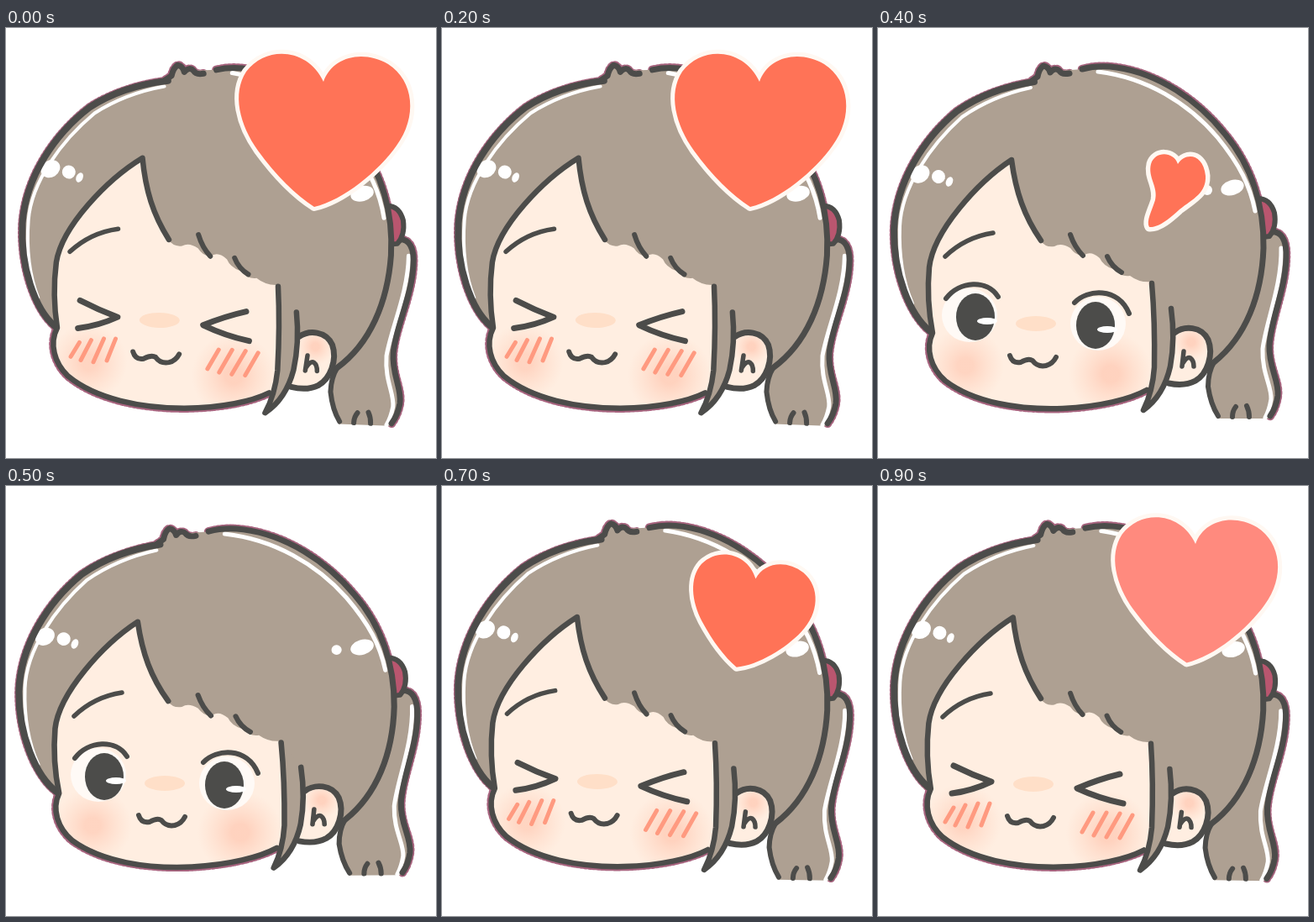
These frames come from a looping animation (512x512 px, 1000 ms). An HTML page with a canvas:

```html
<!DOCTYPE html>
<html lang="en">
<head>
<meta charset="utf-8">
<title>Girl with heart</title>
<style>
html, body { margin: 0; height: 100%; overflow: hidden; background: #fff; }
canvas { display: block; width: 100vw; height: 100vh; }
</style>
</head>
<body>
<canvas id="stage" width="512" height="512"></canvas>
<script>
const ctx = document.getElementById('stage').getContext('2d');
const INK = '#4c4c4a', HAIR = '#aea092', SKIN = '#ffeee1', RED = '#ff7357';

// Head tilt in degrees, head offset, face offset [x, y, tilt], eyes and heart per pose.
const POSES = {
  squat: { rot: -0.5, dy: 0, face: [1, 2, 0], sx: 1.015, sy: 0.988 },
  rise:  { rot: 0, dy: 0, face: [0, 0, 0], sprout: true },
  grow:  { rot: 1.1, dy: 1, face: [-3, 0, 0.4], closed: true,
           heart: { x: 368, y: 152, size: 0.72, tilt: 8, tint: RED } },
  lean:  { rot: 2.1, dy: 1.5, face: [-5, -4, 0.9], closed: true,
           heart: { x: 378.5, y: 122, size: 1, tilt: 0, tint: RED } },
  beat:  { rot: 1.1, dy: 1.5, face: [-3, 3, 0], closed: true,
           heart: { x: 378.5, y: 124, size: 0.95, tilt: 0, tint: '#ff8a7e' } }
};
// The heart beats, shrinks away, then pops back up the same way.
const ORDER = ['lean', 'beat', 'lean', 'grow', 'rise', 'squat', 'rise', 'grow', 'lean', 'beat'];
const STEP = 100;

const shape = d => new Path2D(d);
const sideCurve = 'M62 361C38 342 18 292 19 240C21 184 54 132 94 99C124 78 160 68 186 64';
const crownCurve = 'C258 45 270 45 284 47C334 54 381 86 413 126C445 164 460 212 459 262C457 318 438 368 400 398';
const jaw = 'C118 184 66 242 61 285C58 318 61 342 65 363C56 382 63 405 80 420C114 446 168 455 220 453';
const P = {
  hair: shape(sideCurve + 'L197 45L205 53L216 51L243 49' + crownCurve + 'L345 410L300 380L64 362Z'),
  side: shape(sideCurve),
  knob: shape('M183 63L190 58Q192 48 197 45Q203 46 205 53Q211 46 216 51Q219 56 228 54'),
  crown: shape('M243 49' + crownCurve),
  tail: shape('M462 244C480 241 487 252 486 274C485 312 468 346 466 378C465 404 478 420 476 438Q474 455 465 465L404 465Q394 447 394 424Q395 405 402 396C444 364 462 320 462 244Z'),
  tailRight: shape('M467 243C480 241 487 252 486 274C485 312 468 346 466 378C465 404 478 420 476 438Q474 452 467 462'),
  tailLeft: shape('M400 398Q393 410 393 427Q396 448 405 462'),
  tailTips: shape('M422 463Q422 456 426 451M442 463Q442 456 439 450'),
  tailShine: shape('M480 262C481 306 462 350 458 382C457 412 469 426 468 442Q466 455 461 464'),
  tie: shape('M452 203Q467 203 472 220Q475 237 466 248L458 249Z'),
  shineSide: shape('M41 328C27 296 25 262 26 236C28 190 62 140 100 106Q136 81 182 71'),
  shineCrown: shape('M262 52C320 59 370 90 404 130C431 163 443 188 449 218'),
  face: shape('M159 157' + jaw + 'C272 451 310 440 328 425L327 302Q312 304 300 295Q290 297 280 287Q268 283 264 274Q254 265 246 270Q237 273 229 262Q218 255 210 260Q200 262 193 253C173 224 164 195 159 157Z'),
  bangs: shape('M194 253C174 224 164 195 159 157' + jaw + 'C264 451 300 442 320 431'),
  strands: shape('M229 246Q234 261 244 271M273 272Q278 284 290 291'),
  lock: shape('M326 301L349 335Q354 370 348 403Q340 438 316 455Q327 433 329 404Q330 350 326 301Z'),
  lockLines: shape('M326 304Q330 350 329 404Q327 433 316 455Q340 438 348 403Q354 370 349 334'),
  ear: shape('M352 364C365 354 385 355 393 371C400 389 392 412 378 420Q365 427 345 423Q352 394 352 364Z'),
  earLine: shape('M353 363C365 354 385 355 393 371C400 389 392 412 378 420Q365 427 346 423'),
  earFold: shape('M364 385L362 403M363 399Q368 391 372 393Q376 396 376 403'),
  brow: shape('M80 272Q104 249 137 244'),
  mouth: shape('M157 390Q160 400 170 398Q179 393 184 396Q190 404 200 402Q208 400 212 392'),
  lashes: shape('M81 322C97 301 130 299 143 320M234 327C249 311 286 308 299 340'),
  squint: shape('M93 330Q115 341 138 349Q115 360 91 363M291 340Q266 346 240 357Q266 369 295 375'),
  blush: shape('M93 380L83 397M107 377L95 401M122 375L110 403M136 375L126 401M259 386L246 409M275 386L260 413M291 387L275 415M306 389L291 416'),
  heart: shape('M378 64C360 24 310 20 286 52C269 78 278 115 300 146C322 176 345 199 367 213C402 205 444 170 465 140C490 106 486 63 455 43C424 25 388 35 378 64Z'),
  sprout: shape('M357 162C352 147 330 146 325 162C321 178 334 189 330 205C326 218 319 230 323 237C335 238 349 225 359 216C376 203 391 196 390 176C387 149 366 148 357 162Z')
};

function fill(path, color) {
  ctx.fillStyle = color;
  ctx.fill(path);
}

function line(path, width = 7, color = INK) {
  ctx.lineWidth = width;
  ctx.strokeStyle = color;
  ctx.stroke(path);
}

function oval(x, y, rx, ry, color, turn = 0) {
  ctx.fillStyle = color;
  ctx.beginPath();
  ctx.ellipse(x, y, rx, ry, turn, 0, Math.PI * 2);
  ctx.fill();
}

function glow(x, y, r, alpha) {
  const g = ctx.createRadialGradient(x, y, r * 0.2, x, y, r);
  g.addColorStop(0, `rgba(255,192,168,${alpha})`);
  g.addColorStop(1, 'rgba(255,205,182,0)');
  oval(x, y, r, r, g);
}

function turn(x, y, deg) {
  ctx.translate(x, y);
  ctx.rotate(deg * Math.PI / 180);
  ctx.translate(-x, -y);
}

function fringe() {
  ctx.setLineDash([2, 3]);
  for (const p of [P.side, P.knob, P.crown, P.tailRight, P.bangs]) line(p, 10.5, '#a8647f');
  ctx.setLineDash([]);
}

function drawTail() {
  fill(P.tail, HAIR);
  line(P.tailShine, 5, '#fff');
  line(P.tailRight);
  line(P.tailLeft, 6);
  line(P.tailTips, 6);
  fill(P.tie, '#b9566f');
  line(P.tie, 6);
}

function drawHair() {
  fill(P.hair, HAIR);
  line(P.shineSide, 4, '#fff');
  line(P.shineCrown, 5, '#fff');
  oval(50, 174, 12, 10, '#fff', -0.6);
  oval(72, 177, 8, 8, '#fff', -0.5);
  oval(85, 183, 4, 6, '#fff', 0.4);
  oval(422, 190, 14, 9, '#fff', -0.3);
  oval(392, 193, 6, 6, '#fff');
}

function drawEye(x, y, whiteX) {
  oval(whiteX, y - 2, 33, 32, '#fffaf6');
  oval(x, y, 23, 28, INK);
  oval(x + 14, y + 5, 12, 4, '#fff');
}

function drawFeatures(pose) {
  const [x, y, deg] = pose.face;
  ctx.save();
  ctx.translate(x, y);
  turn(190, 340, deg);
  oval(188, 352, 24, 9, '#ffdfc8');
  if (pose.closed) {
    line(P.blush, 5, '#ff9a80');
    line(P.squint);
  } else {
    drawEye(116, 344, 109);
    drawEye(259, 354, 262);
    line(P.lashes, 6);
  }
  line(P.brow, 5.5);
  line(P.mouth, 6);
  ctx.restore();
}

function drawHead(pose) {
  ctx.save();
  ctx.translate(0, pose.dy);
  turn(265, 250, pose.rot);
  // Squash keeps the bottom of the head in place.
  ctx.translate(253, 465);
  ctx.scale(pose.sx || 1, pose.sy || 1);
  ctx.translate(-253, -465);

  fringe();
  drawTail();
  drawHair();

  fill(P.face, SKIN);
  ctx.save();
  ctx.clip(P.face);
  glow(104, 402, 46, 0.55);
  glow(277, 412, 50, 0.6);
  ctx.restore();

  // Features keep their own offset, independent of the head tilt.
  ctx.save();
  ctx.setTransform(1, 0, 0, 1, 0, 0);
  drawFeatures(pose);
  ctx.restore();

  line(P.side, 8);
  line(P.knob);
  line(P.crown);
  line(P.bangs, 6.5);
  line(P.strands, 6);

  fill(P.ear, SKIN);
  ctx.save();
  ctx.clip(P.ear);
  glow(373, 374, 22, 0.6);
  ctx.restore();
  line(P.earLine);
  line(P.earFold, 5.5);
  fill(P.lock, HAIR);
  line(P.lockLines, 6.5);
  ctx.restore();
}

function drawHeart({ sprout, heart }) {
  if (sprout) {
    line(P.sprout, 11, '#fff8f2');
    fill(P.sprout, RED);
  }
  if (!heart) return;
  ctx.save();
  turn(heart.x, heart.y, heart.tilt);
  ctx.translate(heart.x, heart.y);
  ctx.scale(heart.size, heart.size);
  ctx.translate(-378.5, -122);
  line(P.heart, 10 / heart.size, '#fff8f2');
  fill(P.heart, heart.tint);
  ctx.restore();
}

function draw(time) {
  const pose = POSES[ORDER[Math.floor(time / STEP) % ORDER.length]];
  ctx.fillStyle = '#fff';
  ctx.fillRect(0, 0, 512, 512);
  ctx.lineCap = ctx.lineJoin = 'round';
  drawHead(pose);
  drawHeart(pose);
}

const start = performance.now();
function tick() {
  draw(Math.max(0, performance.now() - start));
  requestAnimationFrame(tick);
}
tick();
</script>
</body>
</html>
```
